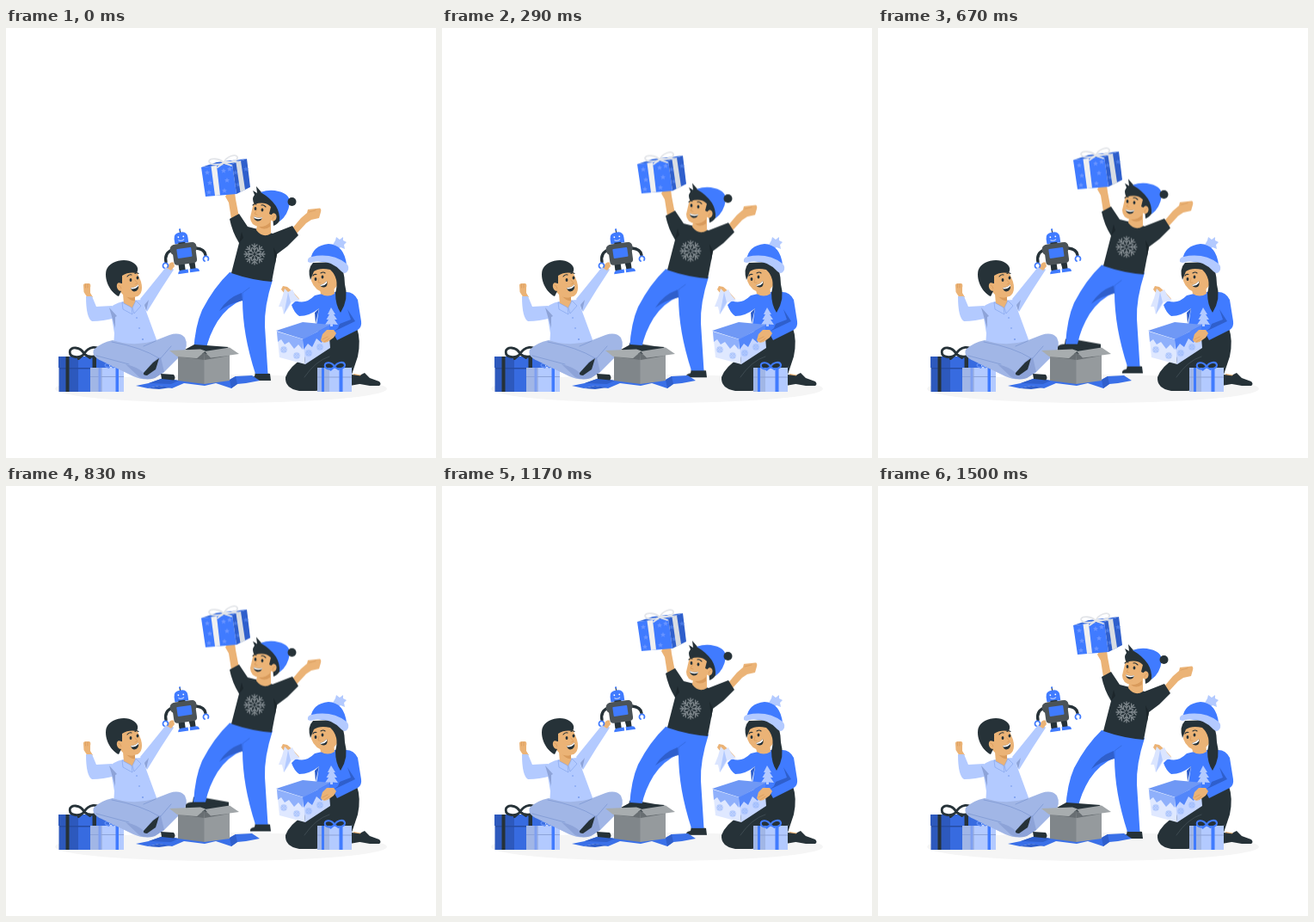
Animation, 500 px wide and 500 px high, one loop 1540 ms. Source, as an HTML page:

```html
<!DOCTYPE html>
<html lang="en">
<head>
<meta charset="utf-8">
<title>Opening presents</title>
<style>
html, body { margin: 0; width: 100%; height: 100%; overflow: hidden; background: #fff; }
svg { display: block; width: 100vw; height: 100vh; }
.blue { fill: #407bff; }
.mid { fill: #2f5fcc; }
.pale { fill: #b3caff; }
.soft { fill: #a1b6e6; }
.fold { fill: #8da3d8; }
.ink { fill: #263238; }
.skin { fill: #ebb376; }
.white { fill: #fff; }
.line { fill: none; stroke-linecap: round; stroke-linejoin: round; }
.crease { stroke: #d99b5c; stroke-width: .8; }
.brow { stroke: #263238; stroke-width: 1.1; }
.float { animation: float 1540ms linear infinite; }
@keyframes float {
  0%, 97.4%, 100% { transform: translateY(0); }
  48.7% { transform: translateY(-9.5px); }
}
</style>
</head>
<body>
<svg viewBox="0 0 500 500">
<defs>
  <g id="cross">
    <path id="ray" d="M0-2V-12M-3-11 0-8 3-11M-2.500-7.500 0-5 2.500-7.500"/>
    <use href="#ray" transform="rotate(90)"/>
    <use href="#ray" transform="rotate(180)"/>
    <use href="#ray" transform="rotate(270)"/>
  </g>
  <g id="flake" class="line" stroke-width="1.3">
    <use href="#cross"/><use href="#cross" transform="rotate(45)"/>
  </g>
  <path id="star" d="M0-3 .9-1 3-.8 1.4.6 1.9 2.7 0 1.6-1.9 2.7-1.4.6-3-.8-.9-1Z"/>
  <path id="bow" class="line" d="M0 0C-4-8-15-8-15-2-15 4-5 5 0 0 4-8 15-9 16-3 16 3 5 5 0 0M0 0-6 5M0 0 6 4"/>
</defs>

<ellipse cx="250" cy="419.500" rx="193" ry="16.500" fill="#f5f5f5"/>

<g id="presents">
  <path fill="#2d59bd" d="M61.500 394H85V423H61.500Z"/>
  <path fill="#376be0" d="M84 394H119V423H84Z"/>
  <path fill="#2d59bd" d="M61 382H85V395H61Z"/>
  <path fill="#376be0" d="M84 382H120V395H84Z"/>
  <path fill="#264ca3" d="M62 395H98V396.500H62Z"/>
  <path class="ink" d="M69.500 382H73.500V423H69.500ZM100.500 382H105V396H100.500Z"/>
  <use href="#bow" transform="translate(91 379)scale(1.12)" stroke="#263238" stroke-width="2.500"/>
  <path class="soft" d="M98 395H113V423H98Z"/>
  <path class="pale" d="M112 395H137V423H112Z"/>
  <path class="fold" d="M98 405H137V406H98Z"/>
  <path fill="#7e9ff0" d="M107.500 395H110.500V423H107.500Z"/>
  <path class="blue" d="M127.500 395H131V423H127.500Z"/>
  <use href="#bow" transform="translate(122 393)scale(.45)" stroke="#5d8cf5" stroke-width="3.500"/>
</g>

<g id="seated-boy">
  <path class="skin" d="M95 314 90.500 307 90 299Q90 297 93 297L97 297Q99 298 98 302L98 308 101 313Z"/>
  <path class="line crease" d="M92.500 298V302M95 298V302"/>
  <path class="pale" d="M93 312 100 312 105 324 123 323 127 337Q113 341 100 341 93 337 93 312Z"/>
  <path class="pale" d="M121 325Q130 318 142 317L158 316 176 365Q153 377 125 371L126 355Z"/>
  <path class="pale" d="M156 315 165 304 186 278Q191 276 195 281L180 304 164 330Z"/>
  <path class="fold" d="M120 325 127 349 127 336 129 335ZM161 322 166 316 163 329Z"/>
  <path class="skin" d="M136 309 149 308 151 322 146 326 137 321Z"/>
  <path fill="#d99b5c" d="M140 312Q147 315 150 312L150 317Q145 318 140 312Z"/>
  <path class="pale" stroke="#7e9fe9" stroke-width=".6" d="M135 319 146 325 147 333 136 327ZM151 317 147 325 149 332 157 323Z"/>
  <g fill="#6f94ea"><circle cx="152" cy="337" r=".8"/><circle cx="155" cy="349" r=".8"/><circle cx="159" cy="362" r=".9"/></g>
  <path class="skin" d="M127 288Q136 280 152 283L157 295Q161 311 149 313 136 315 130 302Z"/>
  <path class="ink" d="M131 312C122 308 114 294 116.500 282 120 270 140 267 148 273 154 277 154 281 152 285 148 284 140 284 135 288L135 297 130 298 134 306Z"/>
  <ellipse class="skin" cx="132.500" cy="301" rx="3.500" ry="5" transform="rotate(-20 132.500 301)"/>
  <path class="line crease" d="M131 299Q134 300 134 303M150 293 153 297 150 298"/>
  <g class="ink"><ellipse cx="145" cy="293" rx="1.400" ry="2"/><ellipse cx="153" cy="290.500" rx="1.400" ry="2"/></g>
  <path class="line brow" d="M141 289Q143 286 146 287M150 285.500Q152 284 154 285.500"/>
  <path class="ink" d="M145 302Q151 302 154 298 155 306 149 306.500 146 306 145 302Z"/>
  <path class="white" d="M145 302Q151 302 154 298L154 300Q151 303.500 146 303.500Z"/>
  <path class="soft" d="M124 363Q110 366 102 374 99 382 111 387L148 405Q162 411 173 407L184 400 205 379Q213 370 208 360 202 353 190 357L172 364Q148 371 124 363Z"/>
  <path class="fold" d="M139 391Q153 394 160 401L170 389 176 384 180 383 184 400 173 407Q163 410 155 406Z"/>
  <path class="line" stroke="#7e98d4" stroke-width=".8" d="M123 365Q157 371 178 384M174 364 160 370M105 381 143 391M179 385 192 370"/>
  <path class="ink" d="M178 384 171 389 160 401Q159 404 164 404L174 397Z"/>
</g>

<g id="robot">
  <path class="line" stroke="#263238" stroke-width="3.400" d="M193 258Q184 262 186 272M221 256Q231 257 232 264M202 273 203 281M214 272 216 279"/>
  <g transform="rotate(-8 207 262)">
    <path class="line" stroke="#263238" stroke-width="1.100" d="M206 238V234"/>
    <circle class="blue" cx="206" cy="234" r="1.100"/>
    <path class="blue" d="M198 250V244Q198 237 206 237T214 244V250Z"/>
    <path class="ink" d="M202 249H210V252H202ZM200 274H206V282H200ZM212 274H218V282H212Z"/>
    <rect x="191.500" y="250.500" width="31" height="12" rx="5" fill="#4b5357"/>
    <rect x="194" y="250.500" width="27" height="24" rx="4" fill="#4b5357"/>
    <rect class="blue" x="199" y="256" width="17" height="11" rx="1"/>
    <path class="blue" d="M197 285Q197 281 202 281H209V285ZM211 285V281H217Q222 281 222 285Z"/>
    <path class="line" stroke="#cbdaff" stroke-width="1" d="M203 246Q206 248 209 246"/>
    <circle class="white" cx="203" cy="242.500" r=".9"/><circle class="white" cx="209" cy="242.500" r=".9"/>
  </g>
  <path class="skin" d="M187 279 190 274Q193 271 195 273L196 277 192 282Z"/>
  <path class="line" stroke="#407bff" stroke-width="1.800" d="M184 279A3 3 0 1 1 188 278M231 271A3 3 0 1 1 235 270"/>
</g>

<g class="float">
  <g id="boy-arms">
    <path class="skin" d="M262 222 259 203 255 196 258 191 266 191 267 199 271 220ZM332 234 343 221 350 215 351 211 365 209.500Q367 211 366 214L364 221 355 223 349 227 338 239Z"/>
    <path class="line crease" d="M352 214 360 212"/>
  </g>
  <g id="boy-legs">
    <path class="ink" d="M218 370 231 371 259 376V384H209V379Q211 376 217 376ZM290 400 307 402 308 410H284Q283 406 289 405Z"/>
    <path class="blue" d="M260 284 310 293Q300 324 301 347L304.500 402 290 402Q275 356 275 316 258 323 246 341 236 357 232 376L218 376Q220 346 228 328 242 301 260 284Z"/>
    <path class="mid" d="M248 329Q257 314 274 308L275 317Q260 320 248 329Z"/>
    <path class="line" stroke="#3266d6" stroke-width=".7" d="M275 317 275 308 283 302"/>
  </g>
  <g id="boy-sweater">
    <path class="ink" d="M260 222 271 216 281 231 293 234 310 239 333 230 340 241 327 254 315 263 313 274 309 295Q285 293 262 285L271 250Q263 237 260 222Z"/>
    <path fill="#1c262b" d="M271 250 274 237 276 244ZM315 263 311 255 313 274Z"/>
    <use href="#flake" x="289" y="263" stroke="#7c858a"/>
  </g>
  <g id="boy-head">
    <path class="skin" d="M293 223 308 221 308 239Q299 245 291 235Z"/>
    <path fill="#d99b5c" d="M294 231Q302 231 307 226L307 231Q300 236 294 231Z"/>
    <path class="skin" d="M288 203Q296 197 308 202L312 213Q309 231 295 231 284 230 284 220Z"/>
    <path class="ink" d="M289 205Q285 199 289 194L287 189 292 192 291 184 297 191 305 190 318 207 319 222Q317 228 311 230L310 218 306 216 308 208Q301 201 289 205Z"/>
    <path class="blue" d="M296 191Q307 187 317 190 330 193 330 203 328 218 318 225 320 205 296 191Z"/>
    <circle class="ink" cx="332.500" cy="202" r="5"/>
    <ellipse class="skin" cx="311" cy="220" rx="3.500" ry="4.700" transform="rotate(15 311 220)"/>
    <path class="line crease" d="M313 218Q310 219 310 222M292 211 289 216 292 217"/>
    <g class="ink"><ellipse cx="290" cy="210" rx="1.400" ry="2.100"/><ellipse cx="298" cy="211.500" rx="1.400" ry="2.100"/></g>
    <path class="line brow" d="M287 206Q289 204 291 205M297 206Q299 205 302 208"/>
    <path class="ink" d="M288 219Q293 222 298 220 297 225 292 224.500 288 223 288 219Z"/>
    <path class="white" d="M288 219Q293 222 298 220L297.500 221.500Q292 223 288.500 221Z"/>
  </g>
  <g id="raised-present">
    <path class="blue" d="M227 162 263 158 268 193 232 196Z"/>
    <path class="mid" d="M263 158 280 152 284 185 268 193Z"/>
    <path fill="#356add" d="M227 162 245 156 280 152 263 158Z"/>
    <g fill="#6994ff">
      <use href="#star" x="234" y="168"/><use href="#star" x="237" y="180"/>
      <use href="#star" x="236" y="191"/><use href="#star" x="253" y="166"/>
      <use href="#star" x="257" y="177"/><use href="#star" x="254" y="189"/>
      <use href="#star" x="260" y="164"/>
    </g>
    <g fill="#4a7be6"><use href="#star" x="267" y="168"/><use href="#star" x="270" y="182"/><use href="#star" x="279" y="164"/></g>
    <path fill="#f0f0f0" d="M238.500 161 245 160 249 194.500 243 195Z"/>
    <path fill="#d9dde3" d="M267.500 156.500 273 154.500 278 188 272.500 191Z"/>
    <path fill="#e4e7ed" d="M238.500 161 266 153.500 272 153 245 160ZM248 156 253 155 273 154.500 267.500 156.500Z"/>
    <path class="line" stroke="#e3e5e9" stroke-width="1.800" d="M253 157C249 151 237 151 236 155 237 160 248 159 253 157 256 149 267 146 269 150 270 155 260 157 253 157L246 162M253 157 262 160"/>
  </g>
</g>

<g id="open-box">
  <path fill="#3a70e8" d="M151 416 166 413 183 407 201 410 260 409 267 405 286 404 295 410 279 413 269 414 262 419 244 413 231 416 207 413 193 419 178 416 165 419Z"/>
  <path class="mid" d="M166 413 183 407 201 410 192 414ZM260 409 267 405 269 414 262 419ZM165 419 178 416 192 418 178 420Z"/>
  <path class="ink" d="M180 402 195 403Q198 407 195 409.500L181 408Z"/>
  <path class="ink" d="M208 374 219 368 259 371 250 377 231 380Z"/>
  <path fill="#80868a" d="M200 379 231 379V414L200 410Z"/>
  <path fill="#959a9d" d="M230.500 379 260 377V410L230.500 414Z"/>
  <path fill="#686e72" d="M200 382 222 384 230.500 377V386ZM230.500 377 238 383 260 381 231 386Z"/>
  <path fill="#a8adaf" d="M190 375 226 373.500 232 375.500 222 384 199 382Z"/>
  <path fill="#a0a5a8" d="M231 376 260 371.500 271 379 238 383.500Z"/>
</g>

<g id="girl">
  <path class="skin" d="M404 402 416 404 420 412 404 412Z"/>
  <path class="ink" d="M413 403 417 401 423 407 434 411Q437 414 434 416L423 416 406 413Z"/>
  <path class="ink" d="M365 350 408 349Q413 363 409 382L402 403 416 405 411 414 388 418 360 422 341 422Q324 419 325 406 329 394 347 383Z"/>
  <path class="line" stroke="#455158" stroke-width=".8" d="M376 382Q360 387 347 406M404 394Q390 399 371 400"/>
  <path class="blue" d="M359 311 376 307 394 307Q404 306 409 316L413 341Q414 348 409 351L385 363 379 352 386 345 386 354 360 352 364 326Q353 335 341 335 335 331 332 322L337 317Q348 322 359 311Z"/>
  <path class="mid" d="M388 344 401 339 397 327 406 341 381 353 386 349ZM364 326 360 344 359 331Z"/>
  <path class="pale" d="M378 325 383 333 381 333 385 339 382 339 386 345 380 344.500V347H377V344.500L371 345 375 339 372.500 339 376 333 374 333Z"/>
  <path class="skin" d="M364 300 381 297 382 309Q374 314 366 309Z"/>
  <path class="skin" d="M356 282Q360 276 379 279L388 290Q386 305 372 308 359 306 355 294Z"/>
  <path class="ink" d="M354 293Q350 280 357 273L386 272Q394 282 394 298 399 315 389 331 383 322 383 308 388 291 377 281 365 278 358 283Z"/>
  <g class="ink"><ellipse cx="360" cy="292" rx="1.400" ry="2"/><ellipse cx="368" cy="289.500" rx="1.400" ry="2"/></g>
  <path class="line brow" d="M357 288Q358 286 361 286.500M366 285Q369 283 371 285"/>
  <path class="line crease" d="M364 291 363 296 366 296"/>
  <path class="ink" d="M365 299Q370 298 373 294 375 301 370 301.500 367 302 365 299Z"/>
  <path class="white" d="M365 299Q370 298 373 294L373 296.500Q371 299.500 366 300Z"/>
  <path class="pale" d="M383 247 384 243 388 246 392 243 392 247 396 249 393 252 394 257 389 255 385 258 384 254 380 252Z"/>
  <path class="blue" d="M354 270Q356 253 375 251 393 252 396 275Z"/>
  <path class="pale" d="M351 272Q350 267 355 266 379 261 396 274 400 278 397 283 394 287 390 283 375 267 354 273Z"/>
  <path class="skin" d="M337 317 330 312 324 309 320 304 322 300 327 301 334 307 341 315Z"/>
</g>

<g id="unwrapped-present">
  <path fill="#dbe5ff" d="M324 303 328 307 333 304 336 310 342 317 332 319 328 326 323 333 321 324 317 324 321 314Z"/>
  <path class="pale" d="M328 307 331 319 323 333 326 318Z"/>
  <path fill="#dfe8ff" d="M315 353 345 362 348 391 318 383Z"/>
  <path fill="#c6d6ff" d="M345 362 375 348 377 372 348 391Z"/>
  <path fill="#6f98f5" d="M314 352 345 342 377 345 346 362Z"/>
  <path fill="#8fb0fb" d="M315 353 345 362 345 374 340 368 335 373 329 365 324 368 320 362 316 365Z"/>
  <path fill="#5386fa" d="M345 362 376 346 376 357 371 356 367 366 361 361 356 371 351 367 346 374Z"/>
  <g stroke="#8fb0fb">
    <use href="#flake" transform="translate(323 374)scale(.32)"/>
    <use href="#flake" transform="translate(338 381)scale(.32)"/>
    <use href="#flake" transform="translate(352 378)scale(.32)"/>
    <use href="#flake" transform="translate(365 371)scale(.32)"/>
  </g>
  <path class="skin" d="M381 351 373 351 368 356 366 363Q368 367 374 365L381 360 384 355Z"/>
  <path class="line crease" d="M368 362 374 359M370 365 376 361"/>
</g>

<g id="small-present">
  <path class="soft" d="M362 395H377V423H362Z"/>
  <path class="pale" d="M376 395H402V423H376Z"/>
  <path class="fold" d="M362 405.500H402V406.500H362Z"/>
  <path class="blue" d="M367 395H370V423H367ZM387.500 395H391.500V423H387.500Z"/>
  <use href="#bow" transform="translate(382 394)scale(.75)" stroke="#407bff" stroke-width="2.800"/>
</g>
</svg>
</body>
</html>
```
